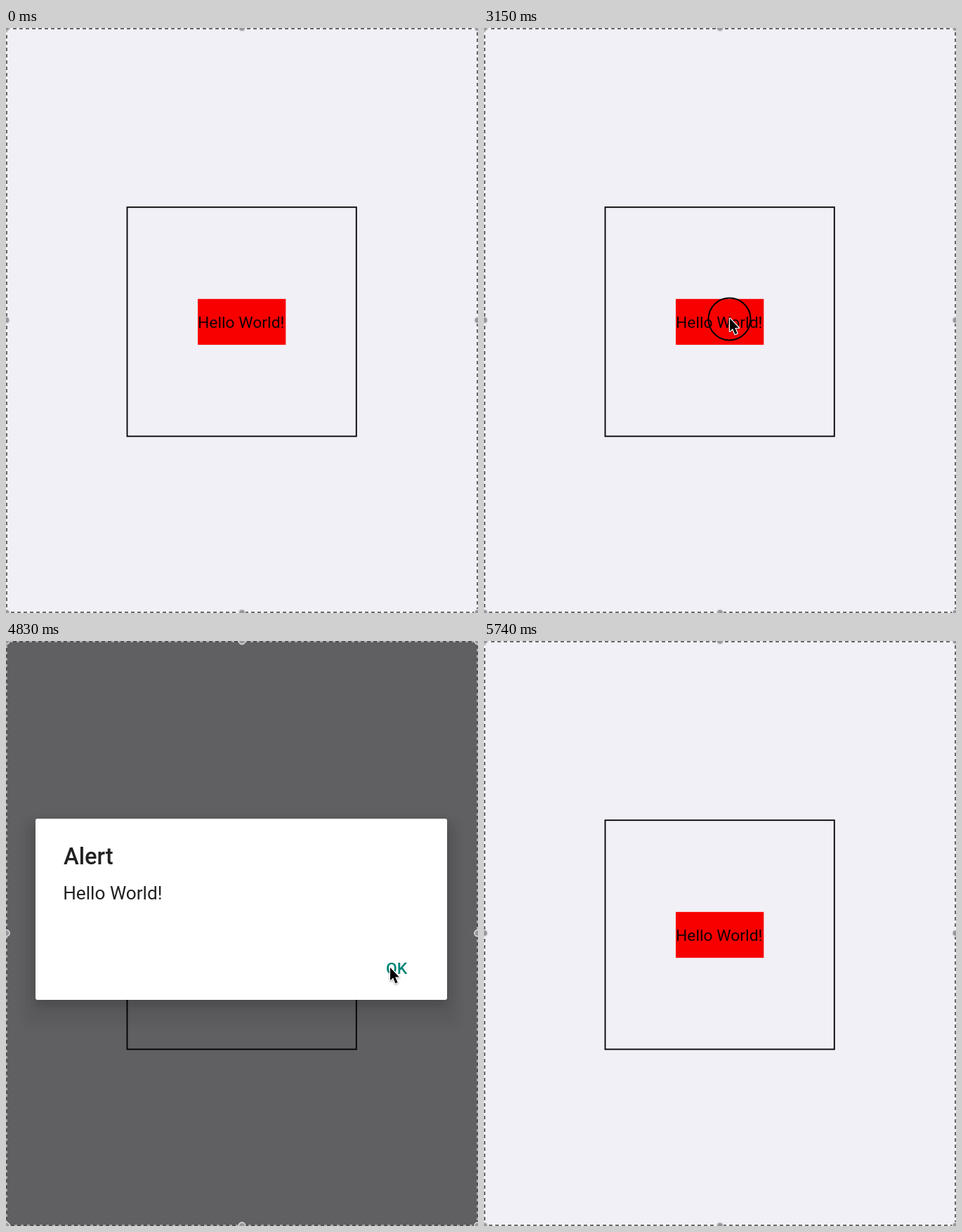
Animation of 672x833 px, one loop 6020 ms. Source, as an HTML page:

```html
<!DOCTYPE html>
<html lang="en">
<head>
<meta charset="utf-8">
<title>Hello World</title>
<style>
  html, body { margin: 0; width: 100%; height: 100%; overflow: hidden; background: #f1f0f6; }
  #stage { position: relative; width: 672px; height: 833px; overflow: hidden; }
  svg { position: absolute; left: 0; top: 0; width: 672px; height: 833px; }
  text { font-family: Roboto, sans-serif; font-size: 22.9px; }
  .medium { font-weight: 500; }
  #dim { position: absolute; inset: 0; background: #000; opacity: 0; }
  #dialog { position: absolute; inset: 0; opacity: 0; }
  #panel {
    position: absolute; left: 42px; top: 253.4px; width: 586.4px; height: 257.6px;
    border-radius: 3px; background: #fff;
    box-shadow: 0 20px 14px 17px rgba(0, 0, 0, .06), 0 7px 16px rgba(0, 0, 0, .2);
  }
</style>
</head>
<body>
<div id="stage">
  <svg viewBox="0 0 672 833">
    <rect x="172.5" y="255.2" width="326.3" height="326.2" fill="none" stroke="#08080c" stroke-width="1.9"/>
    <rect x="273" y="385.8" width="125.3" height="65.3" fill="#f80000"/>
    <text x="273" y="426.6" fill="#140000">Hello World!</text>
  </svg>
  <div id="dim"></div>
  <div id="dialog">
    <div id="panel"></div>
    <svg viewBox="0 0 672 833" fill="#212121">
      <text class="medium" x="81.9" y="318" style="font-size:32.7px">Alert</text>
      <text x="81.2" y="368.2" style="font-size:26.2px">Hello World!</text>
      <text class="medium" x="541" y="473.6" fill="#008577">OK</text>
    </svg>
  </div>
  <svg viewBox="0 0 672 833">
    <g fill="none" stroke-width="2">
      <rect x="1" y="1" width="670" height="831" stroke="#fff" stroke-opacity=".45"/>
      <rect x="1" y="1" width="670" height="831" stroke="#28282c" stroke-opacity=".68" stroke-dasharray="5 4"/>
    </g>
    <g id="handles" fill="#97979b" stroke="#dcdce0" stroke-width="1.6"></g>
    <g id="pointer">
      <circle id="press" cx="-.5" cy="1" r="30" fill="none" stroke="#000" stroke-width="2"/>
      <path d="M0 0V18.4L4.1 14.6L7.4 22.6L10.6 21.2L7.2 13.4H12.8Z" fill="#000" stroke="#fff"
        stroke-width="2.4" stroke-linejoin="round" paint-order="stroke"
        style="filter:drop-shadow(0 1.5px 1.2px rgba(0,0,0,.35))"/>
    </g>
  </svg>
</div>
<script>
const LOOP = 6020, STEP = 70, FADE = 280, PRESS = 140;
const APPEAR = 350, OPEN = 3150, CLOSE = 4970;
const $ = id => document.getElementById(id);
const progress = (t, from, length) => Math.min(1, Math.max(0, (t - from) / length));
const smooth = p => p * p * (3 - 2 * p);
const show = (id, visible) => $(id).style.display = visible ? '' : 'none';

const entry = { x: 612, y: 511 };
const moves = [
  { leave: APPEAR, length: 560, x: 431, y: 414.5 },
  { leave: 1470, length: 700, x: 464, y: 414 },
  { leave: 2590, length: 210, x: 350, y: 413.5 },
  { leave: 3780, length: 420, x: 549, y: 444 },
  { leave: 4410, length: 210, x: 547, y: 465 },
  { leave: 4830, length: 280, x: 568, y: 423 }
];
const presses = [1330, 2450, 3080, 4690];

function pointerAt(t) {
  return moves.reduce((pos, move) => {
    const p = smooth(progress(t, move.leave, move.length));
    return { x: pos.x + (move.x - pos.x) * p, y: pos.y + (move.y - pos.y) * p };
  }, entry);
}

for (const x of [0.5, 336, 671.5])
  for (const y of [0, 416, 832.5]) {
    if (x === 336 && y === 416) continue;
    const dot = document.createElementNS($('handles').namespaceURI, 'circle');
    dot.setAttribute('cx', x);
    dot.setAttribute('cy', y);
    dot.setAttribute('r', 4.6);
    $('handles').append(dot);
  }

function draw(t) {
  const { x, y } = pointerAt(t);
  $('pointer').setAttribute('transform', `translate(${x} ${y})`);
  show('pointer', t >= APPEAR && t < CLOSE + FADE);
  show('press', presses.some(at => t >= at && t < at + PRESS));

  const opening = progress(t, OPEN, FADE), closing = progress(t, CLOSE, FADE);
  $('dim').style.opacity = .6 * opening ** 1.2 * (1 - closing ** 1.55);
  $('dialog').style.opacity = (1 - (1 - opening) ** 1.65) * (1 - closing) ** 1.2;
}

const start = performance.now();
function tick() {
  const t = (performance.now() - start) % LOOP;
  draw(Math.floor(t / STEP) * STEP);
  requestAnimationFrame(tick);
}
tick();
</script>
</body>
</html>
```
